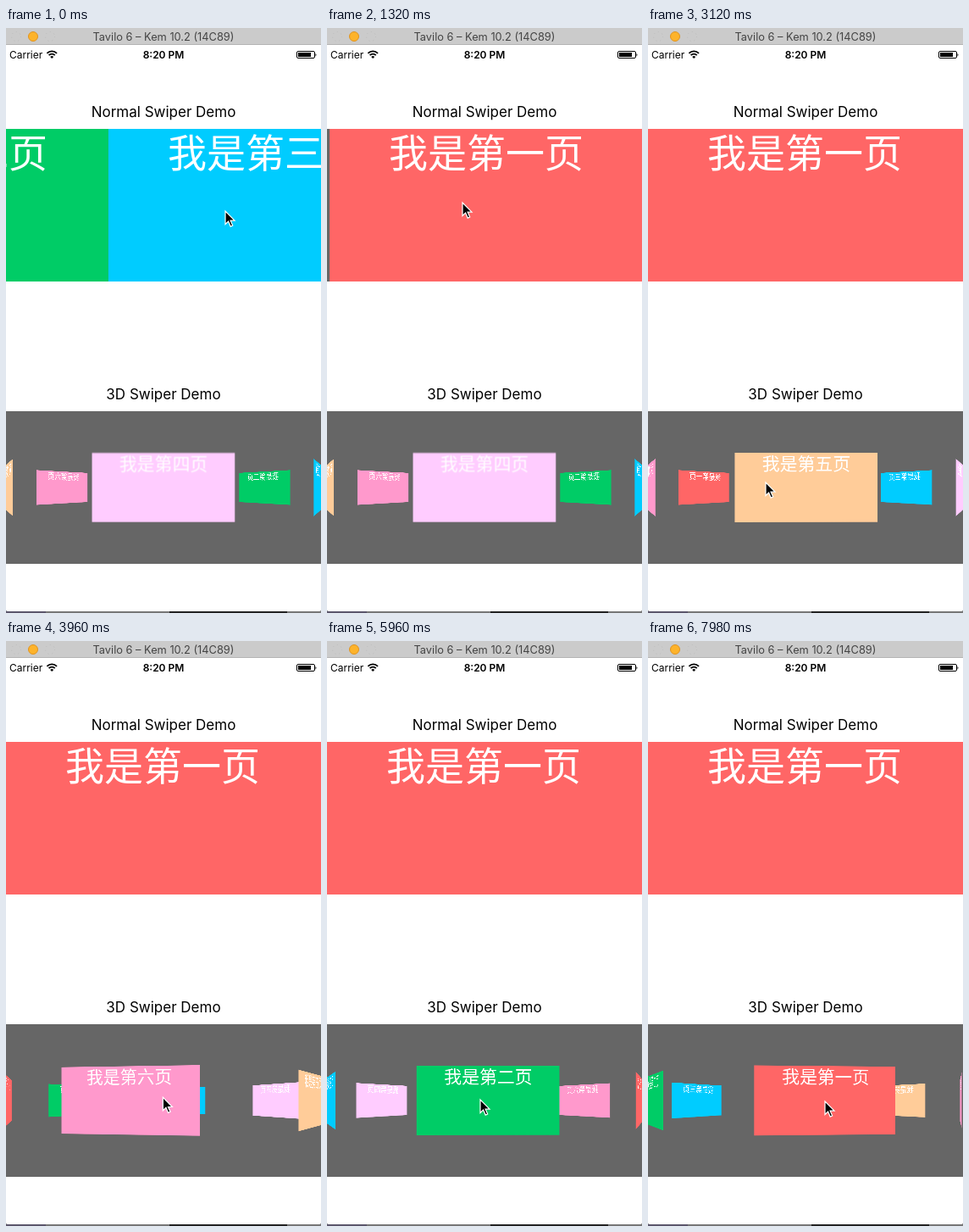
Recreate the animation shown at these times as an HTML page. Size 372 by 690 pixels, loop 8000 ms.

```html
<!DOCTYPE html>
<html lang="zh">
<head>
<meta charset="utf-8">
<title>Swiper Demo</title>
<style>
  html, body { margin: 0; width: 100%; height: 100%; overflow: hidden; background: #fff; }
  #stage { position: relative; width: 372px; height: 690px; overflow: hidden; background: #fff;
    font-family: Inter, Roboto, sans-serif; color: #000; }
  #stage > * { position: absolute; }
  .bar { left: 0; top: 0; width: 372px; height: 20px; background: #cbcbcb; border-bottom: 1px solid #b4b4b4; box-sizing: border-box; }
  .label { left: 0; width: 372px; text-align: center; white-space: nowrap; }
  .title { top: 0; font-size: 12.8px; line-height: 21px; color: #444; }
  .status { top: 22px; font-size: 12px; line-height: 19px; }
  .heading { font-size: 17px; line-height: 24px; }
  .view { left: 0; width: 372px; height: 180px; background: #666; overflow: hidden; }
  #flat { top: 118.5px; }
  #round { top: 452px; perspective: 375px; perspective-origin: 185.5px 90px; }
  #ring { position: absolute; inset: 0; transform-style: preserve-3d; }
  .page { position: absolute; left: 0; top: 0; width: 372px; height: 180px; color: #fff; text-align: center;
    font: 300 46px/50px "Noto Sans CJK SC", "Noto Sans CJK", sans-serif; white-space: nowrap; }
  #flat .page { text-indent: -2px; }
  #ring .page { left: -.5px; }
  svg { left: 0; top: 0; overflow: visible; }
</style>
</head>
<body>
<div id="stage">
  <div class="bar"></div>
  <div class="label title">Tavilo 6 – Kem 10.2 (14C89)</div>
  <div class="status" style="left:4px">Carrier</div>
  <div class="label status" style="font-weight:600">8:20 PM</div>
  <div class="label heading" style="top:87px">Normal Swiper Demo</div>
  <div id="flat" class="view"></div>
  <div class="label heading" style="top:420px">3D Swiper Demo</div>
  <div id="round" class="view"><div id="ring"></div></div>
  <svg width="372" height="690">
    <g fill="none" stroke="#bababa" stroke-dasharray="1 4">
      <circle cx="12" cy="10" r="5.5"/><circle cx="52" cy="10" r="5.5"/>
    </g>
    <circle cx="32" cy="10" r="5.5" fill="#fdb32b" stroke="#df9320"/>
    <g fill="none" stroke="#000" stroke-width="1.9">
      <path d="M48.4 29.8a8.2 8.2 0 0 1 11.6 0M50.6 32.2a5.1 5.1 0 0 1 7.2 0"/>
    </g>
    <path d="M54.2 36l-2-2.1a2.8 2.8 0 0 1 4 0z"/>
    <rect x="343.5" y="27.5" width="21" height="8" rx="1.5" fill="none" stroke="#000"/>
    <path d="M345 29h15v5h-15zM365.5 30q2 1.5 0 3.5z"/>
    <path d="M0 686q0 2 3 2h366q3 0 3-2v4H0z" fill="#777"/>
    <path d="M0 688h47v2H0z" fill="#5b566b"/>
    <path d="M193 688h139v2H193z" fill="#222"/>
    <g id="pointer">
      <g id="press" fill="none">
        <circle cx="1" cy="2" r="20" stroke="#fff" stroke-width="5" opacity=".6"/>
        <circle cx="1" cy="2" r="20" stroke="#000" stroke-width="3"/>
      </g>
      <path d="M0 0V15.5l3.6-3.4 2.6 6 2.5-1.1-2.6-5.8h4.9z" stroke="#fff" stroke-width="1.2"/>
    </g>
  </svg>
</div>
<script>
const LOOP = 8000, WIDTH = 372, RADIUS = 294, SCALE = 0.454;
const PAGES = [['一', '#f66'], ['二', '#0c6'], ['三', '#0cf'], ['四', '#fcf'], ['五', '#fc9'], ['六', '#f9c']];

// [time, value...], eased between rows
const scrollKeys = [[0, 1.675], [380, 1], [560, 1], [1120, 0], [1260, 0], [1380, -.016], [1600, 0]];
const turnKeys = [[0, 4], [2350, 4], [2900, 5], [3120, 5.003], [3500, 5.003], [4100, 6], [4500, 6],
  [5050, 7], [5300, 7], [5800, 8], [5960, 8.0146], [6500, 9], [6720, 9.0195], [8000, 13.082]];
const pointerKeys = [[0, 259, 216], [140, 275, 217], [520, 150, 207], [800, 255, 212], [1240, 155, 206],
  [1320, 160, 206], [1500, 190, 215], [2250, 140, 538], [2600, 205, 542], [3120, 139, 536], [3480, 139, 536],
  [3800, 200, 540], [4300, 140, 533], [4550, 185, 536], [4760, 131, 531], [5280, 142, 538], [5550, 205, 543],
  [5860, 172, 540], [5960, 181, 541], [6250, 212, 543], [6640, 147, 539], [6720, 150, 539], [7050, 215, 543],
  [7400, 150, 540], [7980, 209, 543]];
const presses = [520, 2260, 3480, 5290, 6670];

const $ = id => document.getElementById(id);

function sample(keys, t) {
  const next = keys.findIndex(k => k[0] > t);
  if (next < 0) return keys[keys.length - 1].slice(1);
  const a = keys[next - 1], b = keys[next];
  const s = (t - a[0]) / (b[0] - a[0]), e = s * s * (3 - 2 * s);
  return a.slice(1).map((v, i) => v + (b[i + 1] - v) * e);
}

function addPages(parent) {
  return PAGES.map(([number, color]) => {
    const page = document.createElement('div');
    page.className = 'page';
    page.textContent = `我是第${number}页`;
    page.style.background = color;
    return parent.appendChild(page);
  });
}

const flatPages = addPages($('flat'));
const ringPages = addPages($('ring'));

function draw(t) {
  const [scroll] = sample(scrollKeys, t);
  const [turn] = sample(turnKeys, t);
  const [x, y] = sample(pointerKeys, t);
  flatPages.forEach((page, i) => {
    page.style.transform = `translateX(${(i - scroll) * WIDTH}px)`;
  });
  ringPages.forEach((page, i) => {
    const angle = (turn - i - 1) * 60;
    page.style.transform =
      `translateZ(${-RADIUS}px) rotateY(${angle}deg) translateZ(${RADIUS}px) scale(${SCALE})`;
  });
  $('pointer').setAttribute('transform', `translate(${x} ${y})`);
  $('press').setAttribute('visibility', presses.some(p => t >= p && t < p + 120) ? 'visible' : 'hidden');
}

const start = performance.now();
function tick() {
  draw((performance.now() - start) % LOOP);
  requestAnimationFrame(tick);
}
tick();
</script>
</body>
</html>
```
